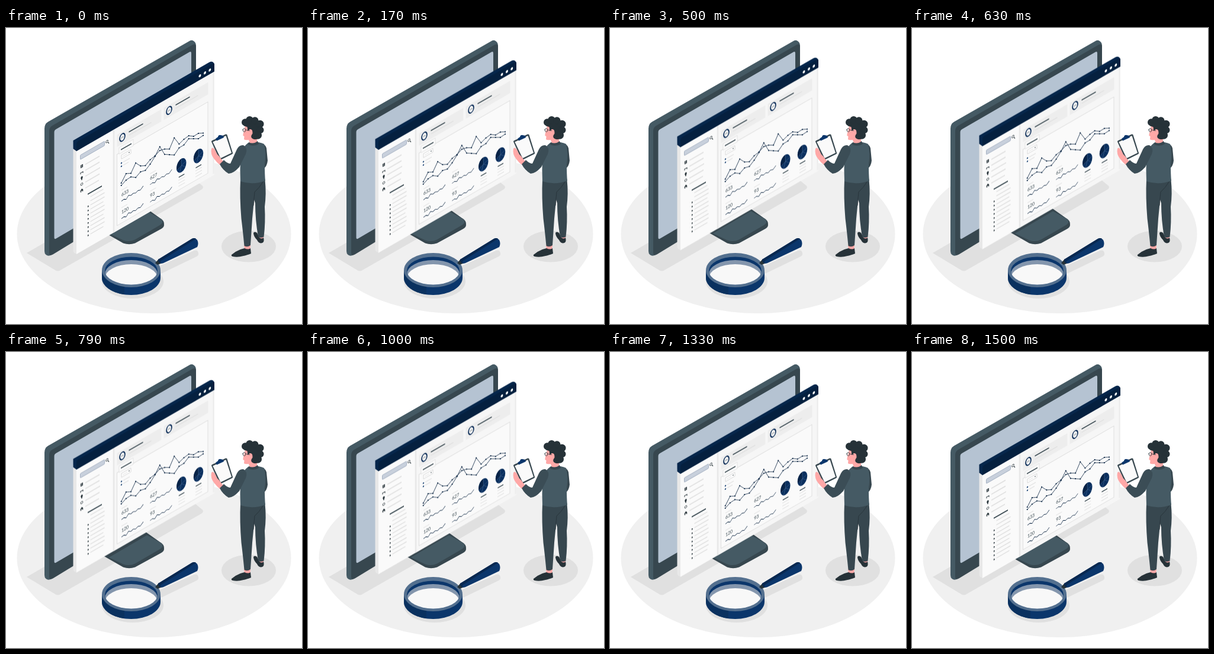
These frames come from a looping animation (500 by 500 pixels, 1540 ms). An HTML page:

```html
<!DOCTYPE html>
<html lang="en">
<head>
<meta charset="utf-8">
<title>Data analysis</title>
<style>
  html, body { margin: 0; width: 100%; height: 100%; overflow: hidden; background: #fff; }
  svg { display: block; width: 100%; height: 100%; }
  text { font-family: Lato, sans-serif; fill: #37474f; }
  .float { animation: float 1540ms linear infinite; }
  @keyframes float {
    0%, 97.4%, 100% { transform: translateY(0); }
    48.7% { transform: translateY(-10px); }
  }
  .pale { stroke: #e0e0e0; }
  .dark { stroke: #37474f; }
  .navy { fill: #0b366b; }
  .ink { fill: #263238; }
  .skin { fill: #ffa8a7; }
  .shade { fill: #e0e0e0; }
  .slate { fill: #455a64; }
  .steel { fill: #37474f; }
</style>
</head>
<body>
<svg viewBox="0 0 500 500">
  <defs>
    <clipPath id="hole"><ellipse cx="211.5" cy="410" rx="44.5" ry="23.5"/></clipPath>
    <g id="card">
      <rect width="75" height="20.5" fill="#ededed"/>
      <ellipse cx="9" cy="9.5" rx="4.4" ry="6.2" fill="#f6f6f6" stroke="#0b2c57" stroke-width="1.7"/>
      <text transform="translate(9 10.5) scale(.866 1)" text-anchor="middle" font-size="3">68%</text>
      <path class="dark" d="M20 6.8h24" stroke-width="1.8"/>
      <path class="pale" d="M20 12.5h38" stroke-width="1.4"/>
    </g>
    <g id="pie">
      <ellipse rx="8.2" ry="11.4" fill="#0a2f5e"/>
      <path d="M0 0V-11.4A8.2 11.4 0 0 0 -7.6 4Z" fill="#072347"/>
      <path d="M0-11.4V0L7 6M0 0L-7.6 4M0 0L-3 10.5M0 0L8-3" fill="none" stroke="#4a6a94" stroke-width=".5"/>
      <path class="dark" d="M-4.5 17.5h9.5" stroke-width="1.4"/>
      <path class="pale" d="M-5 22.5h11m-11 5h11m-11 5h11" stroke-width="1.1"/>
    </g>
    <polyline id="spark" points="0,6 4,5 8,7.5 12,3 16,5.5 20,4 24,6 28,4 32,5.5 37,1.5"
      fill="none" stroke="#0b2440" stroke-width=".8" stroke-linejoin="round"/>
  </defs>

  <!-- floor and shadows -->
  <ellipse cx="250" cy="348" rx="231.5" ry="134" fill="#f0f0f0"/>
  <path class="shade" d="M35 380L290 232L330 265Q336 269 330 273L92 409Q88 412 83 409Z"/>
  <ellipse class="shade" cx="410" cy="369" rx="46" ry="26.5"/>
  <ellipse class="shade" cx="214" cy="428" rx="52" ry="29"/>
  <path class="shade" d="M255 404L318 376Q324 374 325 380Q326 385 320 387L262 415Z"/>

  <!-- stand -->
  <path class="steel" d="M150 338L236 304L260 321Q268 325 267 333Q267 337 260 340.500L218 363.500Q208 367 198 363.500L150 336Z"/>
  <path class="slate" d="M174 347L238 309.500L260 321.500Q269 327 260 333L218 357.500Q208 362 198 358.500Z"/>

  <!-- monitor -->
  <path class="slate" d="M65 377V170Q65 162 71 158.500L309 22.500Q313 19.500 317 22Q321 24.500 321 30V230L79 382Q72 387 67.500 383Q65 381 65 377Z"/>
  <path class="steel" d="M73 380V174Q73 168 78 165L315 28.500Q321 25.500 321 32V235L80 382Q73 386 73 380Z"/>
  <path d="M81.500 354V176Q81.500 172.500 84.500 171L310 40.500Q313 39 313 42.500V222L84 356Q81.500 357 81.500 354Z" fill="#b5c3d2"/>

  <!-- floating window -->
  <g class="float">
    <path d="M113.500 200L119 204V382L115 379.500Q113.500 378.500 113.500 376Z" fill="#e8e8e8"/>
    <path d="M113.500 190L344 57.500Q347 56 349.500 57.500Q352 59 352 62L119 208L113.500 204Z" fill="#06264b"/>
    <g transform="matrix(1 -.577 0 1 119 193)">
      <path d="M0 15H233V187Q233 189 231 189H0Z" fill="#fafafa"/>
      <path d="M64 15H233V187Q233 189 231 189H64Z" fill="#f6f6f6"/>
      <path d="M63 15V189" stroke="#e8e8e8" stroke-width="2.500"/>
      <path d="M231.500 15V187" stroke="#ececec" stroke-width="2"/>
      <path d="M0 15V3Q0 0 3 0H230Q233 0 233 3V15Z" fill="#05203f"/>
      <g fill="#fff">
        <ellipse cx="208.500" cy="8" rx="2" ry="2.300"/>
        <ellipse cx="217" cy="8" rx="2" ry="2.300"/>
        <ellipse cx="225.300" cy="8" rx="2" ry="2.300"/>
      </g>

      <rect x="6.500" y="25.500" width="41" height="7.500" rx="1" fill="#c8d0dc" stroke="#8c9ab0" stroke-width=".6"/>
      <circle cx="51.500" cy="28.500" r="1.800" fill="none" stroke="#263238" stroke-width=".8"/>
      <path d="M53 30.500l2 3" stroke="#263238"/>
      <g class="ink">
        <path d="M7 43h4v5h-4zm1 1.200v.8h2v-.8zm0 2v.8h2v-.8z" fill-rule="evenodd"/>
        <path d="M6.500 55.500h5v1h-5zm0 1h1v1.800h-1zm4 0h1v1.800h-1z"/>
        <ellipse cx="9" cy="65" rx="1.700" ry="2.200"/><path d="M8.200 66h1.600v3h-1.600z"/>
        <circle cx="9" cy="76" r="1.900" fill="none" stroke="#263238" stroke-width=".7"/>
        <path d="M6.800 86l2.200-2.500 2.200 2.500v3h-1.400v-2h-1.600v2h-1.400z"/>
      </g>
      <g id="rows"></g>
      <path class="dark" d="M19 98.800h24" stroke-width="1.900"/>

      <use href="#card" x="68.500" y="27"/>
      <use href="#card" x="147.500" y="27"/>

      <rect x="68.500" y="60" width="153.500" height="120.500" fill="#fafafa" stroke="#d9d9d9" stroke-width=".8"/>
      <rect x="72" y="50.500" width="24" height="11" fill="#fafafa" stroke="#e0e0e0" stroke-width=".7"/>
      <path class="dark" d="M75 56h18" stroke-width="1.800"/>
      <rect x="76" y="65.500" width="16" height="6.500" fill="#fff" stroke="#d0d0d0" stroke-width=".7"/>
      <path class="pale" d="M78 69h8" stroke-width="1"/>
      <path class="ink" d="M88 68h2l-1 1.800z"/>
      <circle class="navy" cx="76" cy="79" r="1.200"/>
      <circle class="navy" cx="76" cy="84.500" r="1.200"/>
      <path class="pale" d="M79 79h11m-11 5.500h9" stroke-width="1.200"/>

      <use href="#pie" x="177.300" y="141.500"/>
      <use href="#pie" x="206" y="142"/>
      <g id="stats"></g>
    </g>
    <g id="chart"></g>
  </g>

  <!-- magnifier -->
  <path class="navy" d="M162 409V422A49.500 29 0 0 0 261 422V409Z"/>
  <path d="M162 409V422A49.500 29 0 0 0 200 450.200V430Z" fill="#0a315f"/>
  <ellipse cx="211.500" cy="409" rx="49.500" ry="29" fill="#54708f"/>
  <g clip-path="url(#hole)">
    <rect class="navy" x="160" y="380" width="104" height="60"/>
    <ellipse cx="211.500" cy="415.500" rx="44.500" ry="23.500" fill="#8496ad"/>
    <ellipse cx="211.500" cy="422.500" rx="44.500" ry="23.500" fill="#f8f8f8"/>
  </g>
  <path class="ink" d="M252 397L258 390L264 397L256 400Z"/>
  <path class="navy" d="M257 391L314 356Q319 353 323 358Q326 364 323 370L266 397Q259 400 257 391Z"/>
  <path d="M257 391L314 356Q318 354 321 356L262 393Q260 396 261 398Q257 396 257 391Z" fill="#082850"/>

  <!-- analyst -->
  <path class="skin" d="M428 350L435 350V358L427 357ZM402 366H413L412 377L403 376Z"/>
  <path class="ink" d="M418 346Q420 343 424 346L428 354Q432 357 435 354Q437 361 433 363Q427 365 424 358Q418 352 418 346Z"/>
  <path class="ink" d="M381 383Q388 377 396 374L403 372Q409 375 413 372L414 381Q406 384 401 385Q391 388 383 386Q380 385 381 383Z"/>
  <path class="steel" d="M412 256H437.500Q440 280 437 302Q438.500 328 435.500 353Q430 355.500 426 352.500Q421 325 421 296L416 280Z"/>
  <path class="steel" d="M396 256L437 257Q435 266 421 277Q418 298 416 322L413 367Q408 371 402.500 368Q400 342 397.500 322Q394.500 285 396 256Z"/>
  <path d="M434 260Q428 270 420 277Q419 286 418 300" fill="none" stroke="#263238" stroke-width=".8"/>
  <path class="steel" d="M430 196Q438 195 440 203L442 224Q441 233 436 237L429 230Z"/>
  <path class="slate" d="M409 194Q424 190 436 196Q440 212 437 230Q437 248 438 258Q417 266 396 259Q395 240 396 222Q395 205 409 194Z"/>
  <path class="skin" d="M404 165L402 174Q400 180 400.500 182L402.500 183L402 188Q404 190 410 189L412 195Q418 198 424 194L425 172Q416 159 404 165Z"/>
  <path class="steel" d="M410 193Q418 197 425 191L427 196Q418 201 409 197Z"/>
  <g class="ink" transform="translate(.5 -.8)">
    <path d="M404 156L424 156L433 170L426 187Q420 191 415 187Q412 184 416 179Q416 171 411 172L408 175L407 168L401 166Z"/>
    <circle cx="403.500" cy="160" r="6"/>
    <circle cx="411" cy="156" r="6.200"/>
    <circle cx="420" cy="157" r="6"/>
    <circle cx="428.500" cy="163" r="6.500"/>
    <circle cx="429" cy="173" r="6"/>
    <circle cx="425" cy="182" r="6.500"/>
  </g>
  <ellipse class="skin" cx="413" cy="175.500" rx="3.200" ry="4"/>
  <ellipse cx="402.500" cy="172.500" rx="2.200" ry="3" fill="none" stroke="#263238" stroke-width=".8"/>
  <path d="M404.700 172L412 173.500M400.500 172H399" stroke="#263238" stroke-width=".8"/>

  <path class="steel" d="M347 192Q347 190.500 348.500 190L371 179.500Q373 179 373.500 180.500L383 211Q383.500 212.500 382 213L364 222Q361 223 360 221Z"/>
  <path d="M349.300 192.500L371.500 182L381 211L362.500 220Z" fill="#fafafa"/>
  <path class="navy" d="M354 187L358 184Q359 180 363 181L367 182L368 185L356 190.500Z"/>
  <path class="skin" d="M347 204Q349 200.500 353 205.500L356.500 213Q361 217 364 222L368 226L361 231Q356 227 351.500 221Q345 213 347 204Z"/>
  <path d="M401 198Q409 202 405 213L394 235Q384 246 376 246Q366 240 361 230L368 223Q374 229 379 229L390 205Q394 197 401 198Z" fill="#3b4d56"/>
</svg>
<script>
  const add = (id, html) => document.getElementById(id).insertAdjacentHTML('beforeend', html);
  const bar = (x, y, w, h) => `<path class="pale" d="M${x} ${y}h${w}" stroke-width="${h}"/>`;

  // sidebar menu and list
  [24, 24, 25, 24, 23].forEach((w, i) => add('rows', bar(15, 46 + 10 * i, w, 1.8)));
  for (let i = 0; i < 10; i++) {
    const y = 105.5 + 7 * i;
    add('rows', bar(23.5, y, i % 3 ? 24 : 22, 1.6));
    if (i > 1) add('rows', `<path class="ink" d="M19 ${y - 1.5}l2.2 1.7-2.2 1.9z"/>`);
  }

  // figures with sparklines
  [[76, 135.5, 633], [124.3, 135.5, 627], [76, 165, 120], [124.3, 165, 93]].forEach(([x, y, n]) =>
    add('stats', bar(x, y - 10.5, 10, 1) +
      `<text transform="translate(${x} ${y}) scale(.866 1)" font-size="8">${n}</text>` +
      `<use href="#spark" x="${x}" y="${y + 2}"/>`));

  // main chart
  const plot = ys => {
    const pts = ys.map((y, i) => [194.7 + 8.14 * i, y]);
    add('chart', `<polyline points="${pts.join(' ')}" fill="none" stroke="#0b2440" stroke-width=".8"/>` +
      pts.map(([x, y]) => `<circle cx="${x}" cy="${y}" r="1.1" fill="#05203f"/>`).join(''));
  };
  plot([262, 246, 245.5, 228, 233, 232.5, 222.5, 216, 207, 204.5, 204.5, 185.5, 196, 188, 182, 183, 178, 177.5]);
  plot([266, 257, 251.5, 252.5, 243, 240.5, 230, 217, 200.5, 213.5, 214, 214.5, 202.5, 197.5, 187, 187, 187, 181.5]);
</script>
</body>
</html>
```
